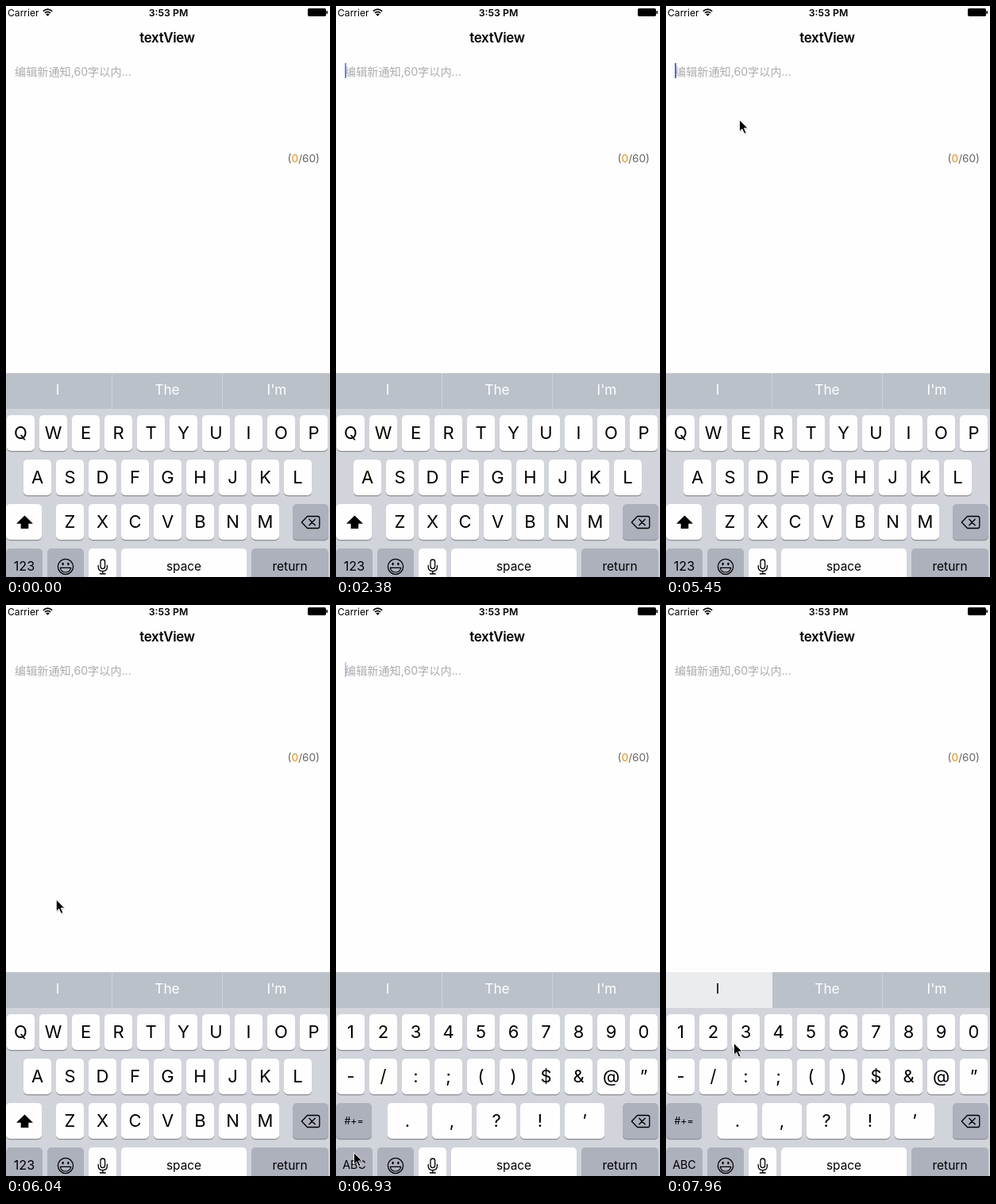
These frames come from a looping animation (408x720 px, 8 s). An HTML page:

```html
<!DOCTYPE html>
<html lang="en">
<head>
<meta charset="utf-8">
<title>Text view</title>
<style>
  html, body { margin: 0; width: 100%; height: 100%; overflow: hidden; background: #fff; }
  svg { display: block; width: 408px; height: 720px; }
  text { font-family: Inter, "Noto Sans CJK SC", "Noto Sans CJK", sans-serif; white-space: pre; }
</style>
</head>
<body>
<svg id="stage" viewBox="0 0 408 720" xmlns="http://www.w3.org/2000/svg"></svg>
<script>
const stage = document.getElementById('stage');

function add(parent, tag, attrs, content) {
  const el = document.createElementNS('http://www.w3.org/2000/svg', tag);
  for (const k in attrs) el.setAttribute(k, attrs[k]);
  if (content !== undefined) el.textContent = content;
  parent.append(el);
  return el;
}
const rect = (p, x, y, width, height, fill, rx = 0) =>
  add(p, 'rect', { x, y, width, height, fill, rx });
const label = (p, s, x, y, size, attrs) =>
  add(p, 'text', { x, y, 'font-size': size, 'text-anchor': 'middle', ...attrs }, s);
const path = (p, d, attrs) => add(p, 'path', { d, ...attrs });
const line = w => ({
  fill: 'none', stroke: '#000', 'stroke-width': w,
  'stroke-linecap': 'round', 'stroke-linejoin': 'round'
});

// Status bar and title
rect(stage, 0, 0, 408, 720, '#fefefe');
label(stage, 'Carrier', 2, 13, 12.1, { 'text-anchor': 'start' });
path(stage, 'M46.8 6.6Q52.5 1.6 58.2 6.6M48.9 8.9Q52.5 5.8 56.1 8.9', { ...line(1.7), 'stroke-linecap': 'butt' });
path(stage, 'M50.2 10.4Q52.5 8.5 54.8 10.4L52.5 12.8Z');
label(stage, '3:53 PM', 204.5, 13, 12.3, { 'font-weight': 600 });
rect(stage, 380, 3, 23, 10, '#000', 1.8);
rect(stage, 403.4, 6, 1.6, 4, '#000', 0.8);
label(stage, 'textView', 203, 46, 17, { 'font-weight': 600, 'letter-spacing': -0.35 });

// Text area
label(stage, '编辑新通知,60字以内...', 11, 87.5, 14.15, { 'text-anchor': 'start', fill: '#adadad' });
const counter = label(stage, '(', 395, 196.5, 13.6, { 'text-anchor': 'end', fill: '#666' });
add(counter, 'tspan', { fill: '#f78a0a' }, '0');
add(counter, 'tspan', {}, '/60)');
const caret = rect(stage, 11, 72, 2, 19, '#4a6bef');

// Suggestions
rect(stage, 0, 463, 408, 257, '#d1d4db');
rect(stage, 0, 463, 408, 45, '#bac1c9');
for (const x of [133, 272]) rect(stage, x, 463, 1, 45, '#cdd2d8');
const glow = rect(stage, 0, 463, 134, 45, '#eaecee');
const [word] = ['I', 'The', "I'm"].map((s, i) =>
  label(stage, s, 65 + 138 * i, 490, 17.2, { fill: '#fff' }));

// Keyboard
const STEP = 41, KEY = 35;

function key(p, x, row, w, s = '', size = 22, dark = false) {
  const y = 516 + 56 * row;
  rect(p, x, y + 1.2, w, 45, '#8b8e95', 5);
  rect(p, x, y, w, 45, dark ? '#adb1bc' : '#fefefe', 5);
  label(p, s, x + w / 2, y + 22 + size * 0.364, size);
}
const keys = (p, chars, x, row, step = STEP, w = KEY) =>
  [...chars].forEach((c, i) => key(p, Math.round(x + i * step), row, w, c));

const letters = add(stage, 'g', {});
keys(letters, 'QWERTYUIOP', 1, 0);
keys(letters, 'ASDFGHJKL', 22, 1);
keys(letters, 'ZXCVBNM', 63, 2);
key(letters, 0, 2, 45);
path(letters, 'M23.5 642.5L34 652.8H28.3V659H18.7V652.8H13Z');
key(letters, 0, 3, 46, '123', 16.2, true);

const symbols = add(stage, 'g', {});
keys(symbols, '1234567890', 1, 0);
keys(symbols, '-/:;()$&@”', 1, 1);
keys(symbols, '.,?!’', 65, 2, 55.75, 50);
key(symbols, 0, 2, 45, '#+=', 12.4, true);
key(symbols, 0, 3, 46, 'ABC', 14.3, true);

key(stage, 361, 2, 45, '', 22, true);
path(stage, 'M379.5 643.5H392.5Q394.8 643.5 394.8 645.8V656.2Q394.8 658.5 392.5 658.5H379.5L372.3 651Z', line(1.3));
path(stage, 'M381.8 647.3L389.2 654.7M389.2 647.3L381.8 654.7', line(1.4));

key(stage, 52, 3, 46, '', 22, true);
add(stage, 'circle', { cx: 75, cy: 707, r: 9.6, ...line(1.3) });
for (const cx of [71.6, 78.4]) add(stage, 'ellipse', { cx, cy: 703.6, rx: 1.2, ry: 1.8 });
path(stage, 'M68.3 708.3H81.7Q80.5 714 75 714Q69.5 714 68.3 708.3Z', line(1.2));

key(stage, 104, 3, KEY);
add(stage, 'rect', { x: 119, y: 698, width: 5.6, height: 11.6, rx: 2.8, ...line(1.3) });
path(stage, 'M116.2 705.5V707.2Q116.2 712.6 121.8 712.6Q127.4 712.6 127.4 707.2V705.5M121.8 712.6V716M118.4 716H125.2', line(1.3));

key(stage, 145, 3, 158, 'space', 15.4);
key(stage, 309, 3, 97, 'return', 15.5, true);

// Mouse pointer
const pointer = add(stage, 'g', {});
const ARROW = 'M0.5 0.5V15.2L3.9 12L6.5 18L9 16.9L6.4 11H11Z';
path(pointer, ARROW, { opacity: 0.18, transform: 'translate(0.6 1.6)' });
path(pointer, ARROW, { stroke: '#fff', 'stroke-width': 0.9 });

// Motion runs in whole ticks, as in a screen recording
const LOOP = 8000, TICK = 146.6;
const SWITCH = 47, PICK = 53;
const STOPS = [
  { n: 32, x: 202, y: 480 },
  { n: 37, x: 92, y: 143 },
  { n: 46, x: 22, y: 690 },
  { n: 48, x: 22, y: 690 },
  { n: 51, x: 43, y: 506 },
  { n: 54, x: 85, y: 552 }
];
const clamp = v => Math.min(1, Math.max(0, v));
const smooth = u => u * u * (3 - 2 * u);
const show = (el, on) => el.setAttribute('visibility', on ? 'visible' : 'hidden');

// Fades in, stays, fades out, rests; typing mode ends the blinking
function caretAlpha(n) {
  const phase = (n + 5.1) % 6.8;
  return n > SWITCH ? 0 : clamp(Math.min(phase / 0.9, (4.85 - phase) / 1.05));
}

function pointerAt(n) {
  const i = Math.max(1, STOPS.findIndex(s => s.n >= n));
  const a = STOPS[i - 1], b = STOPS[i];
  const u = smooth(clamp((n - a.n) / (b.n - a.n)));
  return [a.x + (b.x - a.x) * u, a.y + (b.y - a.y) * u];
}

function draw(ms) {
  const n = Math.floor(ms % LOOP / TICK);
  caret.setAttribute('opacity', caretAlpha(n));
  pointer.setAttribute('transform', `translate(${pointerAt(n)})`);
  show(pointer, n >= STOPS[0].n);
  show(letters, n < SWITCH);
  show(symbols, n >= SWITCH);
  show(glow, n >= PICK);
  word.setAttribute('fill', n >= PICK ? '#000' : '#fff');
}

const start = performance.now();
function tick() {
  draw(performance.now() - start);
  requestAnimationFrame(tick);
}
tick();
</script>
</body>
</html>
```
